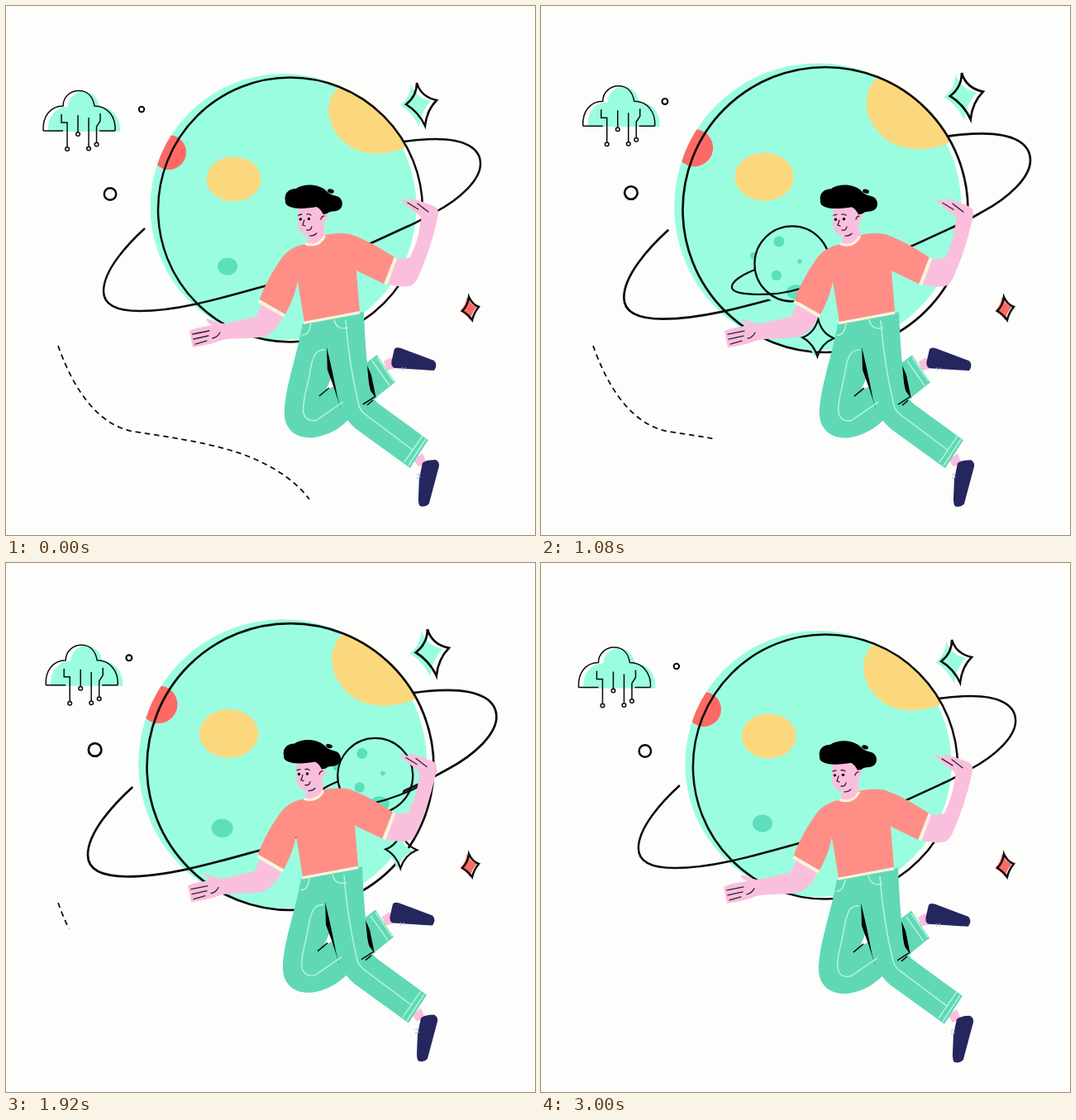
An HTML page for the animation above (3080 ms loop, 640 by 640 pixels).

```html
<!DOCTYPE html>
<html lang="en">
<head>
<meta charset="utf-8">
<title>Floating in space</title>
<style>
  html, body { margin: 0; width: 100%; height: 100%; overflow: hidden; background: #fdfdfc; }
  svg { display: block; width: 100%; height: 100%; }
  .line { fill: none; stroke: #0a0c08; stroke-width: 2.5; }
  .thin { stroke-width: 1.5; }
  .green { fill: #9bfde0; }
  .yellow { fill: #fbd87d; }
  .red { fill: #ff6964; }
  .teal { fill: #5cdfba; }
  .skin { fill: #fabfdc; }
  .shirt { fill: #ff8f86; }
  .pants { fill: #60d8b6; }
  .shoe { fill: #26265e; }
  .cream { fill: none; stroke: #fdf3dc; stroke-width: 4; }
  .seam { fill: none; stroke: #b8f8d8; stroke-width: 1.4; }
  .ink { fill: none; stroke: #2c2238; stroke-width: 1.3; stroke-linecap: round; }
</style>
</head>
<body>
<svg viewBox="0 0 640 640">
  <defs>
    <clipPath id="planetFill"><circle cx="335.5" cy="243" r="161"/></clipPath>
    <clipPath id="planetRim"><circle cx="344" cy="246.5" r="160"/></clipPath>
    <clipPath id="moonRim"><circle r="45.5"/></clipPath>
    <path id="trail" pathLength="1" d="M63 411C78 453 105 506 155 515C195 521 235 527 270 537C315 550 350 573 367 597"/>
    <mask id="trailMask" maskUnits="userSpaceOnUse" x="0" y="0" width="640" height="640">
      <use id="trailReveal" href="#trail" fill="none" stroke="#fff" stroke-width="8"/>
    </mask>
    <path id="bigStar" d="M497 93Q502 110 521 114Q509 126 507 145Q499 128 484 119Q497 109 497 93Z"/>
    <path id="smallStar" d="M1-23Q5-6 20 0Q5 6 0 22Q-5 6-18-1Q-4-6 1-23Z"/>
    <path id="redStar" d="M560 352Q564 361 572 364Q566 371 564 380Q559 373 552 369Q559 362 560 352Z"/>
    <path id="cloudShape" d="M45 151C44 133 54 121 69 121C69 110 78 102.500 88 102.500C98 102.500 105 109 107 121C123 121 133 134 132 151"/>
  </defs>

  <g mask="url(#trailMask)">
    <path class="line" style="stroke-width:1.8" stroke-dasharray="6.500 4.800" d="M63 411C78 453 105 506 155 515C195 521 235 527 270 537C315 550 350 573 367 597"/>
  </g>

  <g id="cloud">
    <use href="#cloudShape" class="green" x="6" y="1"/>
    <g class="line thin">
      <use href="#cloudShape"/>
      <path d="M45 151H69M132 151H113M67 131V141H74V170.500M87 132V152.500M100 135V170M114 130V139L109.500 146V165"/>
      <circle cx="74" cy="173" r="2.300"/><circle cx="87" cy="155" r="2.300"/>
      <circle cx="100" cy="172.500" r="2.300"/><circle cx="109.500" cy="167.500" r="2.300"/>
    </g>
  </g>

  <g id="planet">
    <circle class="green" cx="335.500" cy="243" r="161"/>
    <circle class="red" cx="197" cy="177" r="21" clip-path="url(#planetFill)"/>
    <path class="yellow" clip-path="url(#planetRim)" d="M403 98C384 114 387 143 406 162C424 180 452 183 482 172L500 100Z"/>
    <ellipse class="yellow" cx="275.500" cy="209.500" rx="33" ry="27"/>
    <ellipse class="teal" cx="268" cy="315" rx="12" ry="10.500"/>
    <circle class="line" cx="344" cy="246.500" r="160"/>
    <path class="line" d="M168 269C146 289 118 320 118 345C118 362 135 369 162 369C210 369 265 352 316 338C375 316 430 293 485 267C495 263 502 259 520 249C550 233 574 210 574 191C574 172 555 161 520 161C508 161 495 162 481 164"/>
    <use href="#bigStar" class="green" x="-7" y="1"/>
    <use href="#bigStar" class="line"/>
    <circle class="line" style="stroke-width:2" cx="164" cy="125" r="3.200"/>
    <circle class="line" cx="126" cy="227.500" r="7.200"/>
  </g>

  <use href="#redStar" class="red" x="-2.500"/>
  <use href="#redStar" class="line"/>

  <g id="moon">
    <circle class="green" cx="-9" cy="1" r="46"/>
    <g class="teal">
      <circle cx="-16" cy="-27" r="6.500"/><circle cx="-19" cy="14" r="6.200"/>
      <circle cx="9" cy="-3" r="2.800"/><circle cx="-47" cy="-10" r="4"/>
      <ellipse cx="5" cy="34" rx="12" ry="9" clip-path="url(#moonRim)"/>
    </g>
    <g class="line" style="stroke-width:2.2">
      <circle r="45.500"/>
      <path d="M-45 7C-60 13-73 21-73 28C-73 37-45 38-18 36C5 33 25 26 45 17C60 9 73 0 73-7C73-14 60-15 45-12"/>
    </g>
    <g transform="translate(30.500 90)">
      <use href="#smallStar" class="green" x="-4" y="1"/>
      <use href="#smallStar" class="line" style="stroke-width:2.2"/>
    </g>
  </g>

  <g id="person">
    <!-- legs and shoes -->
    <path class="skin" d="M457 430L466 425L472 438L461 441Z"/>
    <path class="shoe" d="M470 415Q472 412 478 414L518 429Q523 434 518 441L470 438Q465 436 467 428Z"/>
    <path class="skin" d="M493 549L504 541L509 553L499 557Z"/>
    <path class="shoe" d="M504 553Q508 549 520 549Q525 552 524 557L512 602Q508 607 501 605Q499 603 499 596L500 572Z"/>
    <path d="M479 437l1 4M483 437l1 4M497 567l5-1M497 571l5-1" fill="none" stroke="#a9b4e8"/>
    <path class="pants" d="M359 384C352 425 336 465 337 496C339 515 354 524 373 522C392 519 405 510 415 500L471 455L449 422L412 450L400 378Z"/>
    <path fill="#fdfdfc" d="M396 440L401 458L387 465Q393 453 396 440Z"/>
    <path d="M388 407L397 430L405 487L397 462L389 440ZM435 430L442 446L448 475L440 464Z"/>
    <path class="pants" d="M381 380L433 370C434 395 436 425 439 455C441 468 444 476 452 482L511 525L489 559L424 512C410 500 404 487 401 472C396 445 390 420 385 400Z"/>
    <path class="line thin" d="M379 472L391 462M432 482L446 473M437 483L444 477"/>
    <path class="seam" d="M411 380C414 420 421 458 427 483Q429 490 436 495L492 537M386 416C374 415 371 425 368 442C365 462 358 478 360 492Q363 504 376 501L408 479M443 429L464 459M449 425L469 454M482 552L504 520M487 556L508 524M397 379Q400 393 414 389M358 398Q367 399 369 384"/>

    <!-- arms -->
    <path class="skin" d="M310 360L336 374C331 387 322 397 311 400C295 403 278 401 262 404C250 409 238 411 226 413L222 393C230 389 240 388 250 386C246 384 242 382 243 378C252 381 260 385 265 384C280 381 293 378 303 375Z"/>
    <path class="ink" d="M226 397L246 393M227 403L245 399M229 409L243 405M250 402Q256 401 259 395"/>
    <path class="skin" d="M458 336C468 338 480 341 491 338C497 334 500 326 503 318C512 296 519 274 523 252C524 246 521 243 515 241C505 237 495 234 487 232L492 237L477 233C480 239 492 247 501 254C504 258 501 265 500 272C498 285 492 297 489 304C484 306 478 306 470 305Z"/>
    <path class="ink" d="M486 238L499 246M498 239L511 249"/>

    <!-- shirt -->
    <path class="skin" d="M366 272L384 254L386 281Q376 292 364 288Z"/>
    <path class="shirt" d="M362 288C350 290 340 296 333 306C322 322 313 338 307 355L338 373C345 360 350 348 353 333L361 382L428 369L424 320L457 336L470 304C452 292 434 282 417 276C406 274 395 275 386 277C380 287 370 290 362 288Z"/>
    <path class="cream" d="M306 357L337 375M459.500 337L471.500 305"/>
    <path class="cream" style="stroke-width:3" d="M360 383.500L428 371M362 287.500Q378 293 386 278"/>

    <!-- head -->
    <ellipse id="blush" class="red" cx="395" cy="251" rx="7.500" ry="7"/>
    <path class="skin" d="M354 240L353 262C353 272 360 279 368 278C376 277 380 270 382 263C389 262 391 251 386 248L380 240Z"/>
    <path d="M338 236C336 226 343 221 351 221C360 214 380 215 388 224C393 229 397 229 400 230C408 232 409 242 404 246C398 250 393 247 389 251L384 252C382 248 380 245 376 243C366 245 350 246 344 243C339 241 338 239 338 236Z"/>
    <ellipse cx="393" cy="224" rx="4" ry="2.500" transform="rotate(15 393 224)"/>
    <circle cx="356.500" cy="258" r="1.700"/><circle cx="366.500" cy="257.500" r="1.700"/>
    <path class="ink" d="M354 253L358 252M364 252Q367 251 369 253M361 259L359 265L362 266M364 271Q369 272 370 267M381 258Q382 254 385 254M368 278Q373 278 376 275"/>
  </g>
</svg>
<script>
  const LOOP = 3080, FPS = 12, TRAIL_TIME = 2250, TAU = 2 * Math.PI;
  const part = id => document.getElementById(id);
  const clamp = v => Math.min(1, Math.max(0, v));
  // 0 at the start of each cycle, 1 halfway through it
  const swing = (t, cycles, lag = 0) => (1 - Math.cos(TAU * cycles * (t - lag) / LOOP)) / 2;
  // a gentle ease that already moves at both ends
  const softEase = u => 0.35 * u + 0.65 * u * u * (3 - 2 * u);
  const place = (id, x, y) => part(id).setAttribute('transform', `translate(${x} ${y})`);

  function draw(t) {
    const scale = 1 + 0.098 * swing(t, 1);
    part('planet').setAttribute('transform',
      `translate(344 246.5) scale(${scale}) translate(-344 -246.5)`);

    const drift = 8 * swing(t, 2, 40);
    place('cloud', drift, -drift);

    const bob = swing(t, 3, 48);
    place('person', -7 * bob, -9.2 * bob + 0.2);
    part('blush').setAttribute('visibility', bob > 0.35 ? 'visible' : 'hidden');

    // the moon glides along a wide arc at constant speed
    const angle = 0.0382 + 0.000218 * t;
    place('moon', 75.5 + 843 * Math.sin(angle), -499.5 + 843 * Math.cos(angle));
    part('moon').setAttribute('opacity', clamp((t - 100) / 400) * clamp((2470 - t) / 400));

    const shown = 1 - softEase(clamp(t / TRAIL_TIME));
    part('trailReveal').setAttribute('stroke-dasharray', `${shown} 2`);
    part('trailReveal').setAttribute('visibility', shown > 0 ? 'visible' : 'hidden');
  }

  function tick() {
    const t = performance.now() % LOOP;
    draw(Math.floor((t + 4) * FPS / 1000) * 1000 / FPS);
    requestAnimationFrame(tick);
  }
  tick();
</script>
</body>
</html>
```
